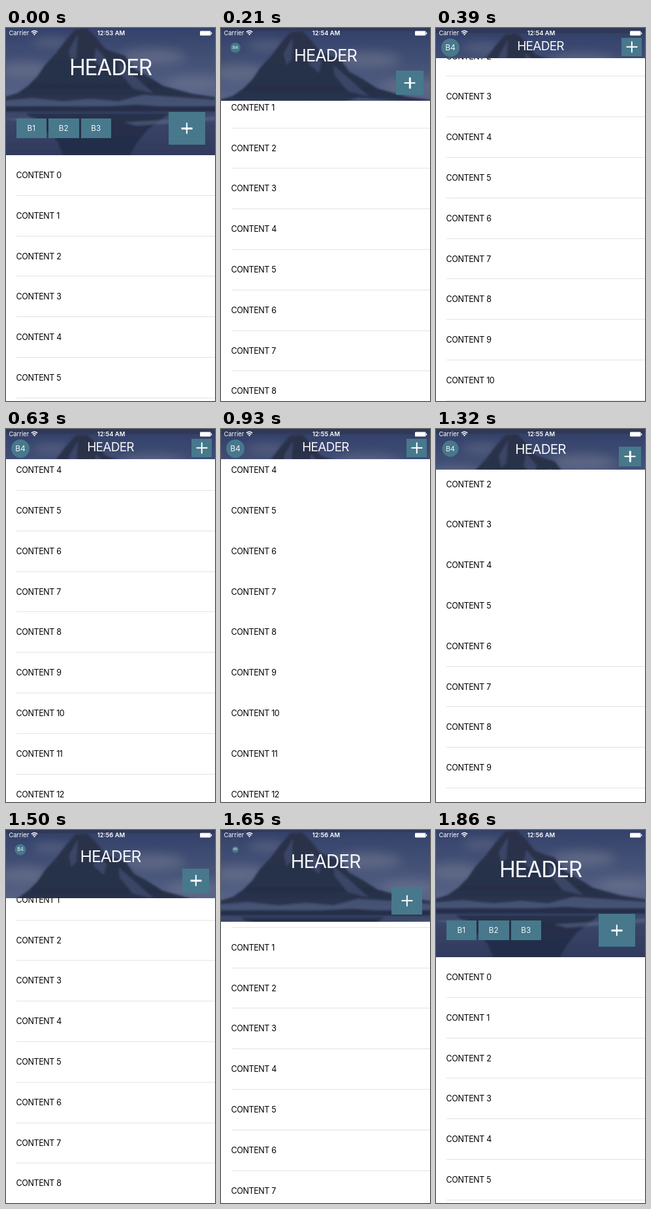
These frames come from a looping animation (320 px wide and 569 px high, 1.95 s). An HTML page:

```html
<!DOCTYPE html>
<html lang="en">
<head>
<meta charset="utf-8">
<title>Collapsing header</title>
<style>
html, body { margin: 0; width: 100%; height: 100%; overflow: hidden; background: #fff; }
body { position: relative; font-family: Inter, "Open Sans", sans-serif; }
#stage, #stage div, #photo, #icons { position: absolute; }
#stage { left: 0; top: 0; width: 320px; height: 569px; overflow: hidden; }
#list { left: 0; top: 194px; width: 320px; }
.row { left: 15.5px; width: 305px; height: 61.8px; line-height: 62px; font-size: 12.5px; letter-spacing: -.38px; color: #000; white-space: pre; }
.row i { position: absolute; left: 0; right: 0; bottom: 0; height: 1px; background: #e2e2e5; }
#head { left: 0; top: 0; width: 320px; overflow: hidden; background: #303a58; color: #f4f6fa; }
#photo { left: 0; top: 0; }
#title { left: 0; width: 320px; height: 50px; line-height: 50px; text-align: center; font-size: 33.5px; font-weight: 400; letter-spacing: -1.3px; }
.tile { background: #47788b; text-align: center; }
.small { width: 46.5px; height: 30.5px; line-height: 30.5px; font-size: 11.7px; bottom: 25.2px; }
#b4 { left: 7.5px; top: 16px; width: 28px; height: 28px; line-height: 27px; border-radius: 50%; font-size: 12px; }
#plus { width: 56px; height: 50px; }
#plus::before, #plus::after { content: ""; position: absolute; background: #fff; left: 50%; top: 50%; width: 17px; height: 2.4px; transform: translate(-50%, -50%); }
#plus::after { width: 2.4px; height: 17px; }
#icons { left: 0; top: 0; }
.bar { top: 0; height: 16px; line-height: 16px; font-size: 9.4px; color: #fff; white-space: nowrap; }
#clock { left: 0; width: 322px; text-align: center; font-weight: 600; }
</style>
</head>
<body>
<div id="stage">
  <div id="list"></div>
  <div id="head">
    <svg id="photo" width="320" height="200" viewBox="0 0 320 200">
      <defs>
        <linearGradient id="sky" x2="0" y2="1">
          <stop offset="0" stop-color="#34416a"/><stop offset=".3" stop-color="#475479"/><stop offset=".55" stop-color="#5a658a"/>
        </linearGradient>
        <linearGradient id="rock" x2="0" y2="1">
          <stop offset="0" stop-color="#2b3349"/><stop offset=".7" stop-color="#262f47"/><stop offset="1" stop-color="#303b58"/>
        </linearGradient>
        <linearGradient id="lake" x2="0" y2="1">
          <stop offset="0" stop-color="#3d486b"/><stop offset=".5" stop-color="#353f62"/><stop offset="1" stop-color="#2d3759"/>
        </linearGradient>
        <filter id="soft" x="-50%" y="-50%" width="200%" height="200%"><feGaussianBlur stdDeviation="8"/></filter>
        <filter id="edge"><feGaussianBlur stdDeviation="1.6"/></filter>
      </defs>
      <rect width="320" height="200" fill="url(#sky)"/>
      <g fill="#71788f" opacity=".6" filter="url(#soft)">
        <ellipse cx="28" cy="64" rx="40" ry="12"/>
        <ellipse cx="225" cy="44" rx="50" ry="12"/>
        <ellipse cx="290" cy="84" rx="45" ry="10"/>
        <ellipse cx="70" cy="22" rx="30" ry="6"/>
      </g>
      <g filter="url(#edge)">
        <path fill="url(#rock)" d="M-5 106L18 99 34 88 48 74 60 56 76 39 92 18 106 2 124 0 138 14 152 32 168 38 182 42 196 62 218 74 240 88 284 100 325 106V130H-5Z"/>
        <path fill="#46527a" opacity=".6" d="M110 10L96 34 100 52 88 64 108 44ZM138 30L134 50 150 64 154 48ZM172 52L174 68 194 92 226 100 200 76Z"/>
        <path fill="#56648a" opacity=".6" d="M-5 111L40 107 88 112 130 108 172 112 210 102 255 105 325 110V119H-5Z"/>
        <path fill="#262f48" d="M-5 121L60 119 120 121 200 117 260 121 325 119V130H-5Z"/>
        <rect x="-5" y="128" width="330" height="80" fill="url(#lake)"/>
        <path fill="#1f2840" opacity=".75" d="M30 130H250L216 156 200 176 184 205H92L78 172 52 148Z"/>
        <path fill="#65708f" opacity=".5" d="M180 144L320 135V141L200 149ZM-5 139L50 136 30 142Z"/>
      </g>
    </svg>
    <div id="title">HEADER</div>
    <div class="tile small" style="left:15.5px">B1</div>
    <div class="tile small" style="left:65px">B2</div>
    <div class="tile small" style="left:114.5px">B3</div>
    <div class="tile" id="b4">B4</div>
    <div class="tile" id="plus"></div>
  </div>
  <div class="bar" style="left:4.5px">Carrier</div>
  <div class="bar" id="clock"></div>
  <svg id="icons" width="320" height="16" fill="none" stroke="#fff" stroke-width="1.4">
    <path d="M38.8 6.2Q43.5 2.2 48.2 6.2M40.6 8.2Q43.5 5.8 46.4 8.2"/>
    <path fill="#fff" stroke="none" d="M41.9 9.4Q43.5 8.2 45.1 9.4L43.5 11.2Z"/>
    <rect x="297" y="4.5" width="16.5" height="7" rx="1.3" fill="#fff" stroke="none"/>
    <rect x="314" y="6.5" width="1.3" height="3" rx=".6" fill="#fff" stroke="none"/>
  </svg>
</div>
<script>
const $ = id => document.getElementById(id);
const LOOP = 1950, STEP = 30, ROW = 61.8, TALL = 193.5, SHORT = 46;

// Scroll path: [time, offset, speed]
const path = [
  [0, 0, .5], [210, 164.6, .82], [400, 312, .68], [630, 408.8, 0], [930, 409, 0],
  [1080, 374, -.4], [1320, 264, -.47], [1650, 106.8, -.5], [1860, 0, -.45]
];

function scrollAt(t) {
  const k = path.findIndex(p => p[0] > t);
  if (k < 0) return 0;
  const [t0, a, va] = path[k - 1], [t1, b, vb] = path[k];
  const d = t1 - t0, u = (t - t0) / d, u2 = u * u, u3 = u2 * u;
  return a * (2 * u3 - 3 * u2 + 1) + b * (3 * u2 - 2 * u3)
    + d * (va * (u3 - 2 * u2 + u) + vb * (u3 - u2));
}

const rows = Array.from({ length: 15 }, (_, i) => {
  const row = document.createElement("div");
  row.className = "row";
  row.textContent = "CONTENT " + i;
  row.style.top = i * ROW + "px";
  $("list").append(row);
  return row.appendChild(document.createElement("i"));
});
const smalls = document.querySelectorAll(".small");

function draw(t) {
  const s = scrollAt(t);
  const h = Math.max(SHORT, TALL - s / 2);
  const p = (TALL - h) / (TALL - SHORT);

  $("list").style.transform = `translateY(${-s}px)`;
  // Separators drop out while the list rests, then return from below
  rows.forEach((line, i) => {
    const shown = t < 780 || t >= 1500 || (t >= 1200 && i >= 6);
    line.style.visibility = shown ? "visible" : "hidden";
  });

  $("head").style.height = h + "px";
  $("photo").style.transform = `translateY(${8 * p}px)`;
  $("title").style.transform = `translateY(${34.5 - 32 * p}px) scale(${1 - .432 * p})`;
  smalls.forEach(b => b.style.opacity = Math.max(0, 1 - p / .3));
  $("b4").style.transform = `scale(${p})`;

  const plus = $("plus").style;
  plus.width = 56 - 25.2 * p + "px";
  plus.height = 50 - 22.5 * p + "px";
  plus.right = 15.5 - 10.5 * p + "px";
  plus.bottom = 15.4 - 11.9 * p + "px";

  $("clock").textContent = `12:${53 + Math.floor((t + 570) / 690)} AM`;
}

function tick() {
  const t = performance.now() % LOOP;
  draw(Math.min(1860, Math.floor(t / STEP) * STEP));
  requestAnimationFrame(tick);
}
tick();
</script>
</body>
</html>
```
